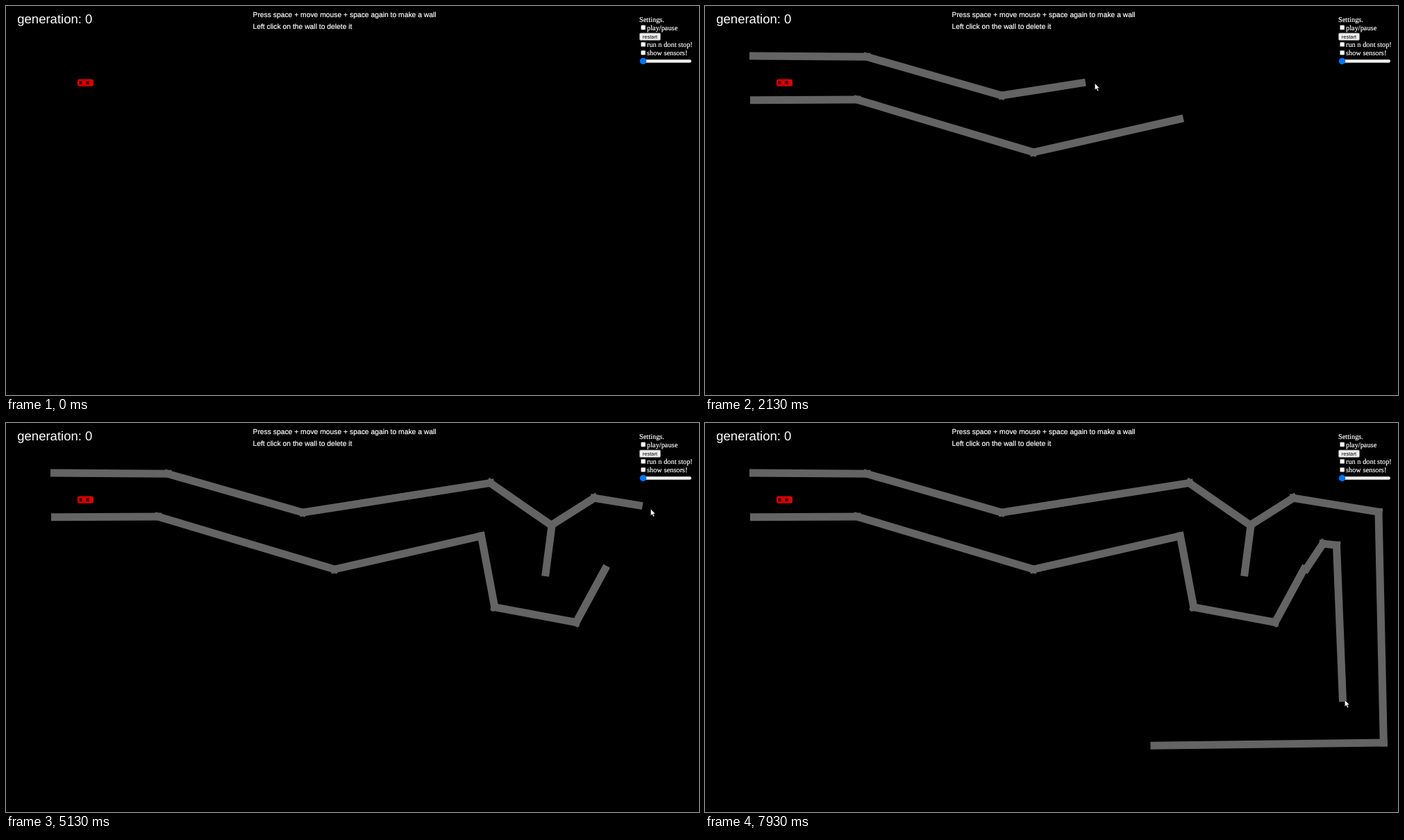
Animation of 998 by 561 pixels, one loop 8 s. Source, as an HTML page:

```html
<!DOCTYPE html>
<html lang="en">
<head>
<meta charset="utf-8">
<title>Wall drawing</title>
<style>
  html, body { margin: 0; width: 100%; height: 100%; overflow: hidden; background: #000; }
  svg { display: block; width: 100%; height: 100%; }
  text { fill: #fff; white-space: pre; text-rendering: geometricPrecision; }
  .sans { font-family: "Liberation Sans", Arial, sans-serif; }
  .serif { font: 10.35px "Liberation Serif", "Times New Roman", serif; }
  .bright { stroke: #fff; stroke-width: .2; }
  .box { fill: #fff; stroke: #767676; stroke-width: .6; }
  #walls { fill: none; stroke: #646464; stroke-width: 11; stroke-linecap: square; }
</style>
</head>
<body>
<svg viewBox="0 0 998 561">
  <rect width="998" height="561"/>
  <text class="sans" x="16.3" y="25" font-size="18.5">generation: 0</text>
  <g class="sans bright" font-size="10.33">
    <text x="355.5" y="16">Press space + move mouse + space again to make a wall</text>
    <text x="355.5" y="33">Left click on the wall to delete it</text>
  </g>

  <g id="car">
    <rect x="103" y="105.4" width="23" height="10.4" rx="3" fill="#e00000"/>
    <path d="M105.5 108h3.4l.9 1v3.2l-.9 1h-3.4z" fill="#400000"/>
    <path d="M115.2 108.6l4-1q1.4 3 0 6l-4-1z" fill="#400000"/>
    <path d="M109.5 107.2h6M109.5 114h6" stroke="#900" stroke-width=".7"/>
  </g>

  <g id="walls"></g>

  <g id="settings">
    <g class="serif bright">
      <text x="912" y="23">Settings.</text>
      <text x="923" y="35">play/pause</text>
      <text x="923" y="59.3">run n dont stop!</text>
      <text x="923" y="71.3">show sensors!</text>
    </g>
    <rect class="box" x="914.5" y="27.8" width="6.4" height="6.4" rx="1"/>
    <rect class="box" x="914.5" y="52.2" width="6.4" height="6.4" rx="1"/>
    <rect class="box" x="914.5" y="64.2" width="6.4" height="6.4" rx="1"/>
    <rect x="912.4" y="39" width="30.2" height="10.4" rx="1.6" fill="#efefef" stroke="#767676" stroke-width=".8"/>
    <text class="sans" x="916.8" y="47" font-size="7.5" style="fill:#000">restart</text>
    <rect x="913" y="77.2" width="74" height="4.5" rx="2.2" fill="#efefef"/>
    <circle cx="917.6" cy="79.5" r="4.7" fill="#0075ff"/>
  </g>

  <path id="cursor" d="M0 0V9.6L2.2 7.6L3.8 11.2L5.4 10.5L3.9 7H6.8Z" fill="#fff" stroke="#000" stroke-width=".5"/>
</svg>
<script>
  const LOOP = 8000, FPS = 15, LEAD = 35;
  const layer = document.getElementById("walls");
  const cursor = document.getElementById("cursor");

  const clamp = v => Math.min(1, Math.max(0, v));
  const smooth = p => p * p * (3 - 2 * p);
  const lerp = (a, b, p) => a.map((v, i) => v + (b[i] - v) * p);
  const dist = (a, b) => Math.hypot(b[0] - a[0], b[1] - a[1]);

  // A stroke draws its corners in one go; power 1 is steady, 2 speeds up.
  function stroke(from, to, power, route) {
    const corners = route.split(" ").map(p => p.split(",").map(Number));
    let total = 0;
    const walls = corners.slice(1).map((b, i) => {
      const a = corners[i], length = dist(a, b), start = total;
      const el = layer.appendChild(document.createElementNS("http://www.w3.org/2000/svg", "path"));
      total += length;
      return { a, b, start, length, el };
    });
    const drawn = t => total * clamp((t - from) / (to - from)) ** power;
    return { from, to, walls, drawn, first: corners[0], last: corners.at(-1) };
  }

  const strokes = [
    stroke(270, 920, 1, "69.5,72 233,73.3 427,129"),
    stroke(1070, 1430, 1, "70.5,135.7 219,135 473,211"),
    stroke(1530, 1800, 1, "473,211 683.5,163"),
    stroke(1880, 2860, 1, "428,129 697.5,86.5 786,148 777.3,215.5"),
    stroke(3200, 4085, 1, "684.5,163 703.8,265.7 821,287.5 862.5,211"),
    stroke(4448, 6163, 2, "786,147 847,108.2 970,128.3 977.3,461 647,465.3"),
    stroke(6500, 7900, 2, "866,210 890,174 909.5,176.3 918.3,396.5")
  ];

  const tip = (w, length) => lerp(w.a, w.b, clamp((length - w.start) / w.length));

  function cursorAt(t) {
    const i = strokes.findIndex(s => t < s.to);
    if (i < 0) return strokes.at(-1).last;
    const s = strokes[i];
    if (t >= s.from) {
      const length = s.drawn(t);
      return tip(s.walls.find(w => length <= w.start + w.length), length);
    }
    const before = strokes[i - 1] || { to: 70, last: [150, 176] };
    return lerp(before.last, s.first, smooth(clamp((t - before.to) / (s.from - before.to))));
  }

  function draw(t) {
    for (const s of strokes) {
      const length = s.drawn(t);
      for (const w of s.walls) {
        w.el.setAttribute("d", length > w.start ? `M${w.a}L${tip(w, length)}` : "");
      }
    }
    const [x, y] = cursorAt(t + LEAD);
    cursor.setAttribute("visibility", t >= 60 ? "visible" : "hidden");
    cursor.setAttribute("transform", `translate(${x + 3} ${y + 3})`);
  }

  // The picture advances in 15 fps steps.
  function tick() {
    const t = performance.now() % LOOP;
    draw(Math.floor(t * FPS / 1000 + 0.06) * 1000 / FPS);
    requestAnimationFrame(tick);
  }
  tick();
</script>
</body>
</html>
```
